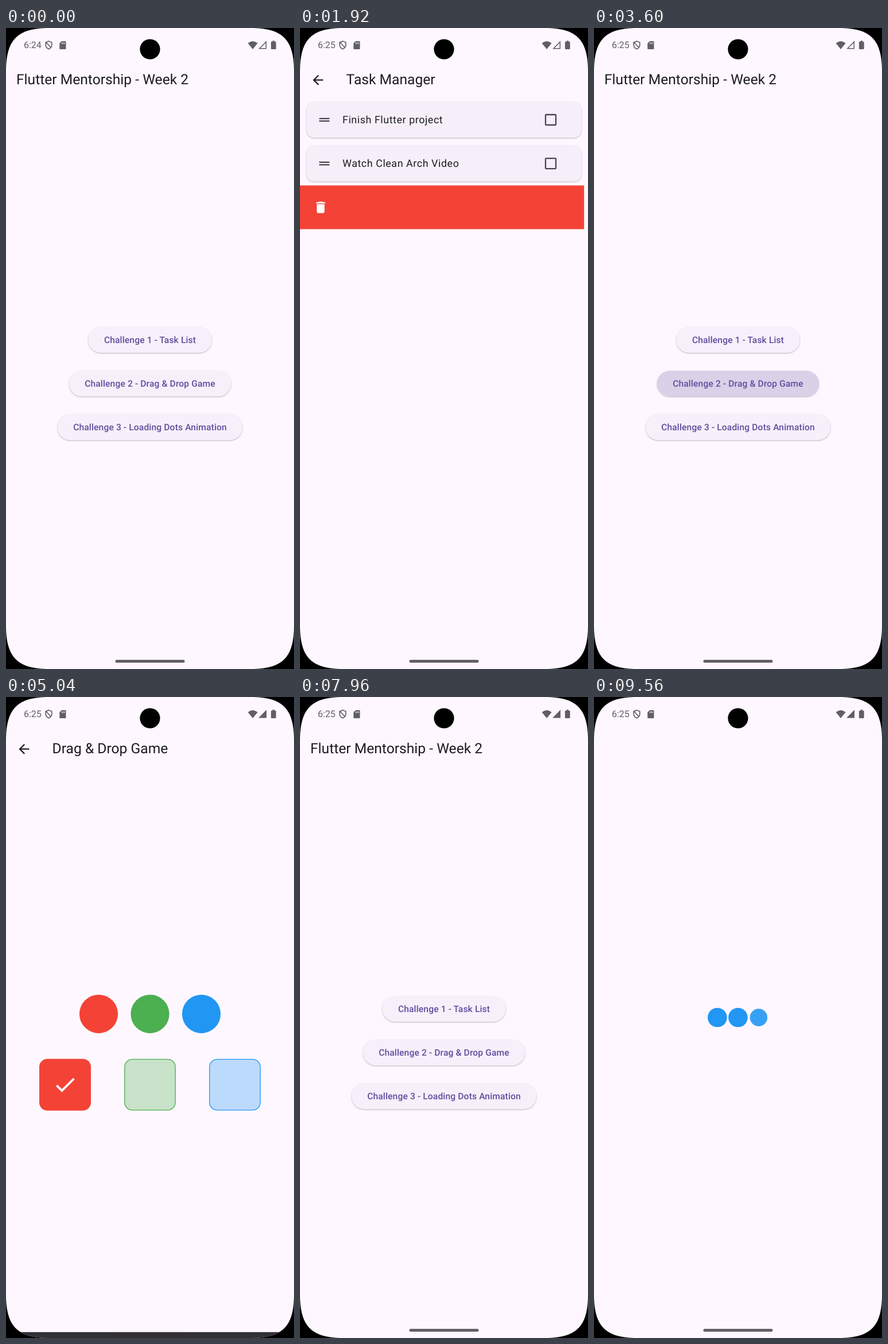
An HTML page that plays this animation: 502x1117 px, repeating every 9.6 s.

```html
<!DOCTYPE html>
<html lang="en">
<head>
<meta charset="utf-8">
<title>Flutter Mentorship</title>
<style>
  html, body { margin: 0; width: 100%; height: 100%; overflow: hidden; background: #000; }
  svg { display: block; width: 502px; height: 1117px; }
  text { font-family: Roboto, sans-serif; fill: #1d1b20; text-rendering: geometricPrecision; }
  .title { font-size: 24.61px; }
  .label { font-size: 15.67px; font-weight: 500; letter-spacing: .11px; text-anchor: middle; fill: #614e9f; }
  .task { font-size: 17.9px; letter-spacing: .56px; }
  .snack { font-size: 15.67px; letter-spacing: .28px; fill: #f5eff7; }
  .clock { font-size: 16px; fill: #625e66; }
  .raised { filter: drop-shadow(0 1.3px 1.1px rgba(0, 0, 0, .27)); }
  .status { fill: #625e66; }
</style>
</head>
<body>
<svg id="stage" viewBox="0 0 502 1117"></svg>
<script>
const LOOP = 9600, SLOT = 76.1, DP = 1.1187;
const RED = '#f44336', GREEN = '#4caf50', BLUE = '#2196f3', SURFACE = '#fef7ff';
const ICONS = {
  back: 'M20 11H7.83l5.59-5.59L12 4l-8 8 8 8 1.41-1.41L7.83 13H20z',
  grip: 'M20 9H4v2h16zM4 15h16v-2H4z',
  trash: 'M6 19c0 1.1.9 2 2 2h8c1.1 0 2-.9 2-2V7H6zM19 4h-3.5l-1-1h-5l-1 1H5v2h14z',
  check: 'M9 16.17L4.83 12l-1.42 1.41L9 19 21 7l-1.41-1.41z'
};

const clamp = v => Math.max(0, Math.min(1, v));
const span = (t, start, length) => clamp((t - start) / length);
const mix = (a, b, p) => a + (b - a) * p;
const smooth = p => p * p * (3 - 2 * p);
const easeOut = p => 1 - (1 - p) ** 2;
const $ = id => document.getElementById(id);
const set = (id, attrs) => {
  for (const key in attrs) $(id).setAttribute(key, attrs[key]);
};

const icon = (name, x, y, size = 24, fill = '#1d1b20') =>
  `<path d="${ICONS[name]}" fill="${fill}" transform="translate(${x} ${y}) scale(${size * DP / 24}) translate(-12 -12)"/>`;
const title = (text, x) => `<text class="title" x="${x}" y="98">${text}</text>`;
const backTitle = text => icon('back', 31.4, 90.7) + title(text, 80.6);

const buttons = [
  ['Challenge 1 - Task List', 215.5],
  ['Challenge 2 - Drag &amp; Drop Game', 282.5],
  ['Challenge 3 - Loading Dots Animation', 322.5]
].map(([text, width], i) => {
  const y = 543.6 + i * SLOT;
  const box = `x="${251 - width / 2}" y="${y - 22.4}" width="${width}" height="44.8" rx="22.4"`;
  return `<rect class="raised" ${box} fill="#f7f0fa"/>
    <rect id="press${i}" ${box} fill="#dad0e8"/>
    <text class="label" x="251" y="${y + 5.4}">${text}</text>`;
}).join('');

const taskCard = (id, text) => `<g id="${id}">
  <rect class="raised" x="11.2" y="128.6" width="479.6" height="62.6" rx="13.4" fill="#f6effa"/>
  ${icon('grip', 42.4, 160, 24, '#49454f')}
  <text class="task" x="74" y="166">${text}</text>
  <rect x="428" y="151" width="18" height="18" rx="1.2" fill="none" stroke="#49454f" stroke-width="2.3"/>
</g>`;

const balls = [[RED, 161.5, 103], [GREEN, 251, 251], [BLUE, 340.5, 399]];
const targets = balls.map(([color, , x], i) => {
  const box = `x="${x - 44.2}" y="631.4" width="88.4" height="88.4" rx="13.2" stroke="${color}" stroke-width="1.3"`;
  return `<rect ${box} fill="${color}" fill-opacity=".3"/>
    <g id="done${i}"><rect ${box} fill="${color}"/>${icon('check', x, 675.6, 40, '#fff')}</g>`;
}).join('');
const circles = balls.map(([color, x]) => `<circle cx="${x}" cy="552.3" r="33.6" fill="${color}"/>`).join('');
const dragged = balls.map(([color], i) => `<circle id="drag${i}" r="33.6" fill="${color}"/>`).join('');

const pages = {
  home: title('Flutter Mentorship - Week 2', 18) + buttons,
  tasks: backTitle('Task Manager') +
    `<rect id="swipeBack" y="274.4" fill="${RED}"/><g id="trash">${icon('trash', 36, 312.5, 24, '#fff')}</g>` +
    taskCard('groceries', 'Buy groceries') + taskCard('finish', 'Finish Flutter project') +
    taskCard('watch', 'Watch Clean Arch Video'),
  game: backTitle('Drag &amp; Drop Game') + targets + circles + dragged,
  loading: [0, 1, 2].map(i => `<circle id="dot${i}" cx="${215 + 36 * i}" cy="558.5" fill="${BLUE}"/>`).join('')
};

// The display corners flatten gradually into the edges.
const corner = 'M0 76C0 20 20 0 76 0H426C482 0 502 20 502 76V1041C502 1097 482 1117 426 1117H76C20 1117 0 1097 0 1041z';

$('stage').innerHTML = `
  <defs><clipPath id="screen"><path d="${corner}"/></clipPath></defs>
  <rect width="502" height="1117"/>
  <g clip-path="url(#screen)">
    <rect width="502" height="1117" fill="${SURFACE}"/>
    ${Object.keys(pages).map(name => `<g id="${name}">${pages[name]}</g>`).join('')}
    <g id="snackbar"><rect width="502" height="82" fill="#322f35"/><text class="snack" id="message" x="18" y="33"></text></g>
    <rect id="handle" x="190.5" y="1101" width="121" height="5" rx="2.5"/>
  </g>
  <text class="clock" id="clock" x="31" y="35.2"></text>
  <path d="M74.5 23l5.3 2v4.6q0 4.8-5.3 7.1-5.3-2.3-5.3-7.1V25zM70 25l8.500 9.500" fill="none" stroke="#625e66" stroke-width="1.7"/>
  <path class="status" d="M97 23h6.3q1.2 0 1.2 1.2v11.6q0 1.2-1.2 1.2h-8.8q-1.2 0-1.2-1.2v-9z"/>
  <path d="M97.5 25v3m2.3-3v3m2.3-3v3" stroke="${SURFACE}" stroke-width="1"/>
  <path class="status" d="M421.600 26.5q8.5-7 17 0L430.1 37z"/>
  <path id="signal" d="M453.3 24.2v11.6h-11.4z" stroke="#625e66" stroke-width="1.5"/>
  <path class="status" d="M464.5 23.7v-1.5h3.6v1.5h1.4q1.2 0 1.2 1.2v10.9q0 1.2-1.2 1.2h-6.4q-1.2 0-1.2-1.2V24.9q0-1.2 1.2-1.2z"/>
  <circle cx="251" cy="37" r="17.6"/>`;

// Each visit: page, arrival time, whether it was reached by going back.
const visits = [
  ['home', -400, false], ['tasks', 360, false], ['home', 2900, true],
  ['game', 3700, false], ['home', 7260, true], ['loading', 8010, false]
];
const snacks = [
  [2260, 3180, 'Buy groceries deleted'], [4480, 4936, 'Correct!'],
  [5540, 6130, 'Correct!'], [6520, 7480, 'Correct!']
];
const taps = [[160, 480], [3460, 3860], [7966, 8160]];
const drags = [[4080, 4440], [5180, 5500], [6300, 6480]];

function showPage(name, opacity, scale) {
  set(name, {
    opacity, display: opacity > 0 ? 'inline' : 'none',
    transform: `translate(251 558.5) scale(${scale}) translate(-251 -558.5)`
  });
}

function drawPages(t) {
  Object.keys(pages).forEach(name => showPage(name, 0, 1));
  const index = visits.findLastIndex(visit => t >= visit[1]);
  const [name, start, isBack] = visits[index];
  const p = easeOut(span(t, start, 145));
  if (p < 1) showPage(visits[index - 1][0], clamp(1 - p * 1.4), isBack ? mix(1, .88, p) : mix(1, 1.05, p));
  showPage(name, clamp(p * 1.4), isBack ? mix(1.05, 1, p) : mix(.88, 1, p));
}

function drawTasks(t) {
  const swap = smooth(span(t, 1120, 120));
  const drag = mix(1.3 * smooth(span(t, 860, 440)), 1, smooth(span(t, 1440, 220)));
  const lifted = span(t, 820, 80) * (1 - span(t, 1600, 100));
  set('finish', { transform: `translate(0 ${SLOT * (1 - swap)})` });
  set('watch', {
    transform: `translate(0 ${SLOT * drag})`,
    style: lifted ? `filter: drop-shadow(0 2px ${4 * lifted}px rgba(0,0,0,${.25 * lifted}))` : ''
  });
  const offset = 502 * easeOut(span(t, 1800, 137));
  const height = SLOT * (1 - smooth(span(t, 1980, 180)));
  set('groceries', { transform: `translate(${offset} ${SLOT * 2})` });
  set('swipeBack', { width: offset, height });
  set('trash', {
    opacity: offset > 46 && height > 18 ? 1 : 0,
    transform: `translate(0 ${(height - SLOT) / 2})`
  });
}

function drawGame(t) {
  drags.forEach(([start, end], i) => {
    const [, from, to] = balls[i];
    const p = smooth(span(t, start, end - start));
    set('drag' + i, { cx: mix(from, to, p), cy: mix(552.3, 675.6, p), opacity: t > start && t < end ? 1 : 0 });
    set('done' + i, { opacity: t >= end ? 1 : 0 });
  });
}

function drawDots(t) {
  const cycle = Math.max(0, t - 8067) / 480 % 2;
  const phase = cycle > 1 ? 2 - cycle : cycle;
  for (let i = 0; i < 3; i++) {
    const size = .5 + .5 * clamp((phase - .2 * i) / .6);
    set('dot' + i, { r: 16.8 * size, opacity: size });
  }
}

function drawSnackbar(t) {
  let height = 0, light = 0;
  for (const [start, end, text] of snacks) {
    if (t < start || t > end + 330) continue;
    height = 82 * easeOut(span(t, start, 120)) * (1 - span(t, end, 120));
    light = span(t, start + 60, 80) * (1 - span(t, end + 170, 150));
    $('message').textContent = text;
  }
  set('snackbar', { transform: `translate(0 ${1117 - height})`, opacity: height > 0 ? 1 : 0 });
  const tone = Math.round(mix(98, 249, light));
  set('handle', { fill: `rgb(${tone},${tone - 2},${tone + 3})` });
}

function draw(t) {
  drawPages(t);
  taps.forEach(([start, end], i) =>
    set('press' + i, { opacity: span(t, start, 120) * (1 - span(t, end, 80)) }));
  drawTasks(t);
  drawGame(t);
  drawDots(t);
  drawSnackbar(t);
  $('clock').textContent = t < 1000 ? '6:24' : '6:25';
  set('signal', { fill: t < 3960 ? 'none' : '#625e66' });
}

const begin = performance.now();
function tick() {
  draw((performance.now() - begin) % LOOP);
  requestAnimationFrame(tick);
}
tick();
</script>
</body>
</html>
```
